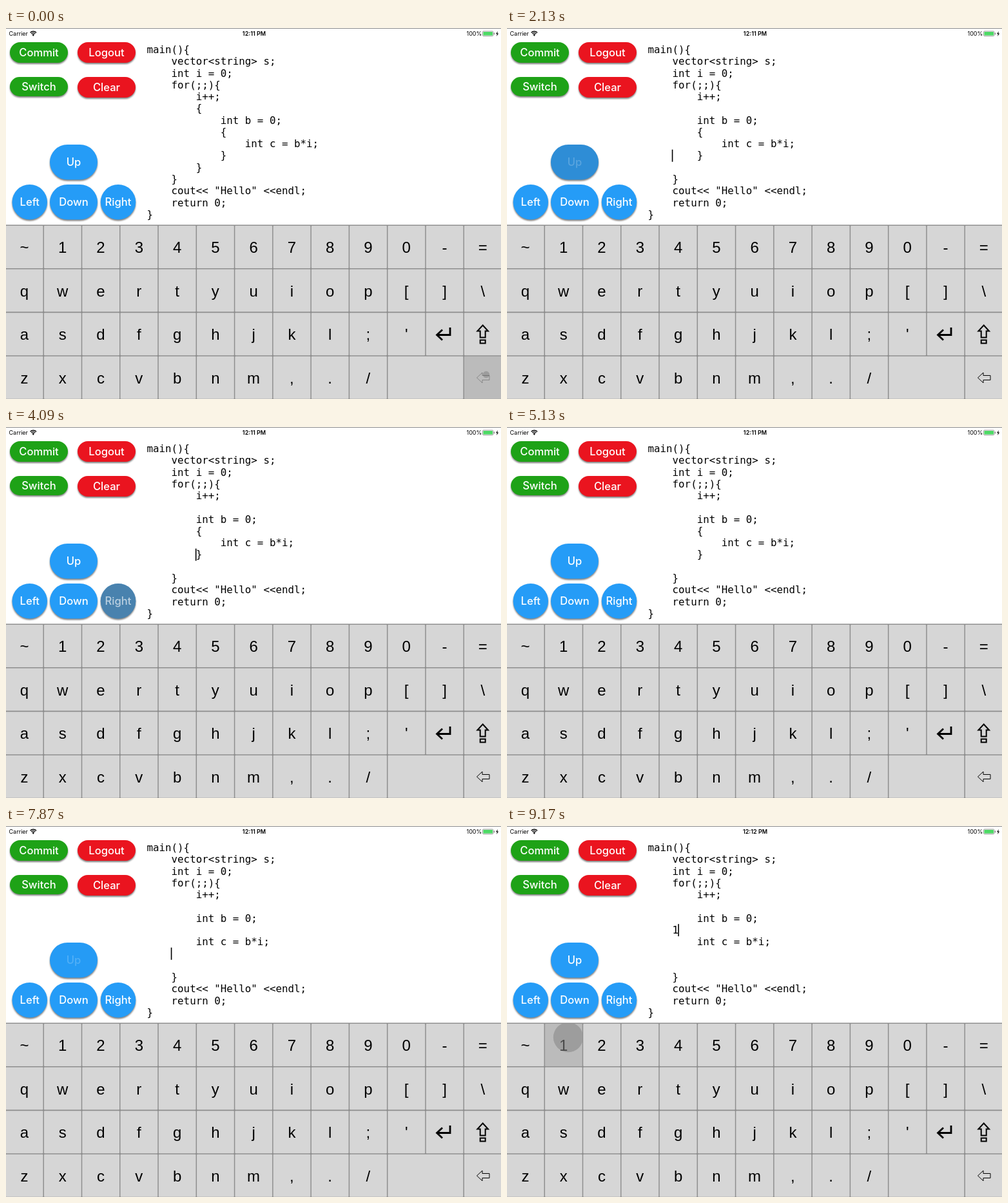
An HTML page for the animation above (9210 ms loop, 768 px wide and 576 px high).

```html
<!DOCTYPE html>
<html lang="en">
<head>
<meta charset="utf-8">
<title>Tablet code editor</title>
<style>
  html, body { margin: 0; width: 100%; height: 100%; overflow: hidden; background: #fff; }
  svg { display: block; width: 768px; height: 576px; }
  .code { font: 15.82px "DejaVu Sans Mono", monospace; }
  .key { font: 24px "Liberation Sans", sans-serif; text-anchor: middle; }
  .label { font: 500 16.6px Inter, sans-serif; text-anchor: middle; fill: #fff; }
  .status { font: 9px Inter, sans-serif; }
  .shadow { filter: drop-shadow(0 2px 1.2px rgba(0, 0, 0, .5)); }
</style>
</head>
<body>
<script>
const LOOP = 9210;
const CHAR = 9.52, LINE = 18.27, CODE_X = 218.5, CODE_Y = 39;
const GREEN = '#1ea217', RED = '#ea141f', BLUE = '#259cf7';

function add(parent, tag, attrs = {}, text) {
  const node = document.createElementNS('http://www.w3.org/2000/svg', tag);
  for (const name in attrs) node.setAttribute(name, attrs[name]);
  if (text !== undefined) node.textContent = text;
  parent.append(node);
  return node;
}
const clamp = v => Math.max(0, Math.min(1, v));
const ramp = (t, from, to) => clamp((t - from) / (to - from));

const svg = add(document.body, 'svg', { viewBox: '0 0 768 576' });
const pads = {};

// A surface that shows a tint and a growing circle when touched.
function addPad(name, x, y, width, height, rx, fill, shadow) {
  const group = add(svg, 'g');
  const shape = { x, y, width, height, rx };
  const id = 'clip' + Object.keys(pads).length;
  add(add(group, 'clipPath', { id }), 'rect', shape);
  add(group, 'rect', { ...shape, fill, class: shadow ? 'shadow' : '' });
  const tint = add(group, 'rect', { ...shape, fill: '#505050', opacity: 0 });
  const ripple = add(add(group, 'g', { 'clip-path': `url(#${id})` }), 'circle',
    { fill: '#707070', opacity: 0 });
  const face = add(group, 'g');
  return pads[name] = { tint, ripple, face };
}

function addButton(name, x, y, w, h, fill) {
  const { face } = addPad(name, x, y, w, h, Math.min(w, h) / 2, fill, true);
  add(face, 'text', { x: x + w / 2, y: y + h / 2 + 6, class: 'label' }, name);
}

function addStatusBar() {
  add(svg, 'rect', { width: 768, height: 1, fill: '#8a8a8a' });
  add(svg, 'text', { x: 4.5, y: 12, class: 'status' }, 'Carrier');
  for (const r of [2, 4.3, 6.6]) {
    const d = r * .72;
    add(svg, 'path', { d: `M${42.3 - d} ${12 - d}A${r} ${r} 0 0 1 ${42.3 + d} ${12 - d}`,
      fill: 'none', stroke: '#000', 'stroke-width': 1.4 });
  }
  add(svg, 'circle', { cx: 42.3, cy: 11.6, r: 1 });
  add(svg, 'text', { x: 714.5, y: 12, class: 'status' }, '100%');
  add(svg, 'rect', { x: 739.5, y: 5, width: 16.5, height: 7.5, rx: 1.5, fill: '#fff',
    stroke: '#777', 'stroke-width': .7 });
  add(svg, 'rect', { x: 740.5, y: 6, width: 14.5, height: 5.5, rx: .6, fill: '#4cd964' });
  add(svg, 'rect', { x: 756.8, y: 7.3, width: 1.2, height: 3, rx: .6, fill: '#777' });
  add(svg, 'path', { d: 'M763 5l-3 4.2h2l-1 3.8 3.2-4.6h-2z' });
}

function addKeyboard() {
  add(svg, 'rect', { y: 305.5, width: 768, height: 270.5, fill: '#8e8e8e' });
  const rows = ['~1234567890-=', 'qwertyuiop[]\\', "asdfghjkl;'⏎⇧", 'zxcvbnm,./ _⌫'];
  const icons = {
    '⏎': { d: 'M689 465v11.5h-20M677 468.5l-8.5 8 8.5 8', 'stroke-width': 2.8 },
    '⇧': { d: 'M739.7 461.5l8.3 9h-4.3v10h-8v-10h-4.3zM735.7 484.5h8v5h-8z', 'stroke-width': 2 },
    '⌫': { d: 'M730.5 543l8.5-8v4.5h11v7h-11v4.5z', 'stroke-width': 1 }
  };
  rows.forEach((row, r) => [...row].forEach((name, c) => {
    if (name === '_') return;
    const x = -.3 + 59.27 * c, y = 307 + 67.6 * r;
    const width = name === ' ' ? 117 : 57.8;
    const { face } = addPad(name, x, y, width, 66, 1, '#d6d6d6');
    if (icons[name]) add(face, 'path', { ...icons[name], fill: 'none', stroke: '#000' });
    else add(face, 'text', { x: 28.5 + 59.27 * c, y: 349 + 67.6 * r, class: 'key' }, name);
  }));
}

addStatusBar();
const clock = add(svg, 'text', { x: 385, y: 12, class: 'status',
  'text-anchor': 'middle', 'font-weight': 600, style: 'font-weight:600' });
addButton('Commit', 6, 22, 90, 32, GREEN);
addButton('Logout', 111, 22, 90, 32, RED);
addButton('Switch', 6, 76, 90, 30, GREEN);
addButton('Clear', 111, 76, 90, 32, RED);
addButton('Up', 68, 181, 74, 54.5, BLUE);
addButton('Left', 9.5, 243, 54.5, 54.5, BLUE);
addButton('Down', 68, 243, 74, 54.5, BLUE);
addButton('Right', 146.8, 243, 54.5, 54.5, BLUE);
addKeyboard();

// Code rows; removing a brace pair pulls its contents one level out.
const head = [[0, 'main(){'], [4, 'vector<string> s;'], [4, 'int i = 0;'], [4, 'for(;;){'], [8, 'i++;']];
const tail = [[4, '}'], [4, 'cout<< "Hello" <<endl;'], [4, 'return 0;'], [0, '}']];
const none = [0, ''];
const bodies = [
  [[8, '{'], [12, 'int b = 0;'], [12, '{'], [16, 'int c = b*i;'], [12, '}'], [8, '}']],
  [none, [8, 'int b = 0;'], [8, '{'], [12, 'int c = b*i;'], [8, '}'], none],
  [none, [8, 'int b = 0;'], none, [8, 'int c = b*i;'], none, none],
  [none, [8, 'int b = 0;'], [4, '1'], [8, 'int c = b*i;'], none, none]
];
const rowNodes = Array.from({ length: 15 }, (_, i) =>
  add(svg, 'text', { y: CODE_Y + LINE * i, class: 'code' }));
const caret = add(svg, 'rect', { width: 1.6, height: 19 });

// Edits: time, body, caret row, caret column
const edits = [
  [-400, 0, 10, 9], [150, 1, 10, 4], [2120, 1, 9, 4],
  [2600, 1, 9, 5], [3035, 1, 9, 6], [3470, 1, 9, 7], [3900, 1, 9, 8], [4335, 1, 9, 9],
  [6740, 2, 9, 4], [7900, 2, 8, 4], [8300, 2, 7, 4], [9022, 3, 7, 5]
];
// Touches: time, pad, x, y
const taps = [
  [-90, '⌫', 745, 538], [900, '⌫', 745, 538], [2070, 'Up', 105, 208],
  ...[2550, 2985, 3420, 3850, 4285].map(t => [t, 'Right', 174, 270]),
  [5740, '⌫', 748, 538], [6480, '⌫', 748, 538],
  [7850, 'Up', 105, 208], [8250, 'Up', 105, 208], [8972, '1', 95, 328]
];
const tapped = [...new Set(taps.map(tap => tap[1]))];

function drawTouches(t) {
  for (const name of tapped) {
    const { tint, ripple, face } = pads[name];
    const tap = taps.filter(([start, pad]) => pad === name && start <= t).pop();
    const age = tap ? t - tap[0] : 1e4;
    const fade = 1 - ramp(age, 280, 430);
    tint.setAttribute('opacity', .2 * ramp(age, 20, 50) * fade);
    ripple.setAttribute('opacity', .4 * fade);
    ripple.setAttribute('r', Math.max(0, Math.min(80, (age - 60) / 6)));
    face.setAttribute('opacity', .2 + .8 * ramp(age, 60, 400));
    if (tap) {
      ripple.setAttribute('cx', tap[2]);
      ripple.setAttribute('cy', tap[3]);
    }
  }
}

function drawCode(t) {
  const [time, body, row, col] = edits.filter(edit => edit[0] <= t).pop();
  [...head, ...bodies[body], ...tail].forEach(([indent, text], i) => {
    rowNodes[i].setAttribute('x', CODE_X + CHAR * indent);
    if (rowNodes[i].textContent !== text) rowNodes[i].textContent = text;
  });
  const blink = (t - time) % 1000;
  const on = t - time < 200 || blink < 200;
  caret.setAttribute('opacity', on ? 1 : 1 - ramp(blink, 200, 280) + ramp(blink, 800, 880));
  caret.setAttribute('x', CODE_X + CHAR * col - .8);
  caret.setAttribute('y', 24.3 + LINE * row);
}

function draw(now) {
  const t = now % LOOP;
  clock.textContent = t < 8100 ? '12:11 PM' : '12:12 PM';
  drawTouches(t);
  drawCode(t);
}

const start = performance.now();
function tick() {
  draw(performance.now() - start);
  requestAnimationFrame(tick);
}
tick();
</script>
</body>
</html>
```
